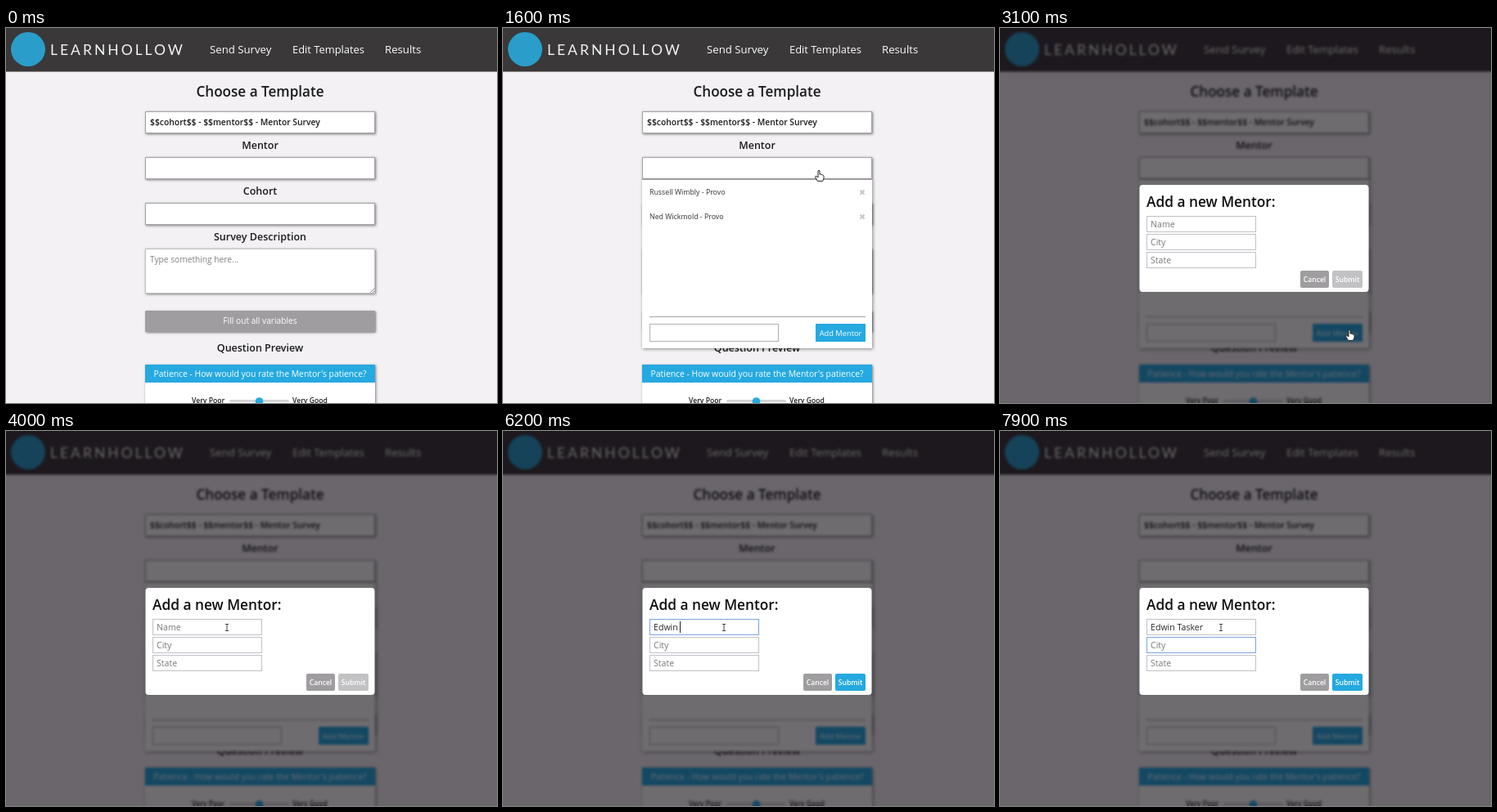
Write an HTML page with a canvas that moves like this. It is 600 px wide and 459 px high and loops after 8000 ms.

```html
<!DOCTYPE html>
<html lang="en">
<head>
<meta charset="utf-8">
<title>Survey template form</title>
<style>
html, body { margin: 0; width: 100%; height: 100%; overflow: hidden; background: #f3f1f4; }
canvas { display: block; width: 600px; height: 459px; }
</style>
</head>
<body>
<canvas id="stage" width="600" height="459"></canvas>
<script>
const W = 600, H = 459, LOOP = 8000, STEP = 100;
const BLUE = '#25a9e0', INK = '#1b1a1c', GREY = '#9f9d9f';
const stage = document.getElementById('stage').getContext('2d');

// Times of interface changes, in ms
const OPEN = 1600, HOVER = 2700, MODAL = 3100, FOCUS = 4200, TAB = 7500;
const NAME = 'Edwin Tasker';
const KEYS = [5400, 5600, 5700, 5800, 5900, 6200, 6300, 6500, 6600, 6800, 6900, 7100];

// Pointer path: time, x, y of the hot spot
const PATH = [
  [100, 572, 452], [400, 560, 372], [800, 541, 292],
  [1300, 541, 292], [1600, 386, 174],
  [1900, 386, 174], [2700, 427, 369],
  [3100, 427, 369], [3700, 283, 247],
  [3900, 283, 247], [4000, 270, 240]
];

const clamp = v => Math.max(0, Math.min(1, v));
const ease = v => v * v * (3 - 2 * v);

function text(c, str, x, y, size, color = INK, weight = 400, align = 'left') {
  c.font = `${weight} ${size}px "Open Sans", "Noto Sans", sans-serif`;
  c.fillStyle = color;
  c.textAlign = align;
  c.fillText(str, x, y);
}

function rect(c, x, y, w, h, color, radius = 0) {
  c.fillStyle = color;
  c.beginPath();
  c.roundRect(x, y, w, h, radius);
  c.fill();
}

function outline(c, x, y, w, h, color) {
  c.strokeStyle = color;
  c.lineWidth = 1;
  c.strokeRect(x + 0.5, y + 0.5, w - 1, h - 1);
}

function shadowed(c, draw, blur = 3, alpha = 0.5) {
  c.save();
  c.shadowColor = `rgba(0,0,0,${alpha})`;
  c.shadowBlur = blur;
  c.shadowOffsetX = c.shadowOffsetY = 1;
  draw();
  c.restore();
}

function field(c, y, h, border = '#a5a3a6') {
  shadowed(c, () => rect(c, 170, y, 281, h, '#fff'));
  outline(c, 170, y, 281, h, border);
}

function drawNav(c) {
  rect(c, 0, 0, W, 53.5, '#3a3839');
  c.fillStyle = '#2b9dca';
  c.beginPath();
  c.arc(27, 26, 21, 0, 7);
  c.fill();
  c.font = '400 17.5px Lato, sans-serif';
  c.fillStyle = '#f4f4f4';
  c.textAlign = 'left';
  c.letterSpacing = '3px';
  c.fillText('LEARNHOLLOW', 54, 32.5);
  c.letterSpacing = '0px';
  text(c, 'Send Survey', 249, 31, 13.2, '#fff', 500);
  text(c, 'Edit Templates', 350, 31, 12.9, '#fff', 500);
  text(c, 'Results', 463, 31, 13.2, '#fff', 500);
}

function drawForm(c) {
  const heading = (str, y, size = 12.5) => text(c, str, 310.5, y, size, INK, 600, 'center');
  heading('Choose a Template', 84, 17.1);
  field(c, 102, 27);
  text(c, '$$cohort$$ - $$mentor$$ - Mentor Survey', 176, 119, 10.35, INK, 600);
  heading('Mentor', 148);
  field(c, 158, 27);
  heading('Cohort', 204);
  field(c, 214, 27);
  heading('Survey Description', 260);
  field(c, 270, 55, '#c4c2c5');
  text(c, 'Type something here...', 176, 287, 10.2, '#828083');
  c.strokeStyle = '#8d8b8d';
  c.beginPath();
  c.moveTo(445, 324); c.lineTo(450, 319);
  c.moveTo(448, 324); c.lineTo(450, 322);
  c.stroke();
  shadowed(c, () => rect(c, 170, 346, 281, 26, GREY, 1));
  text(c, 'Fill out all variables', 310.5, 362, 10.2, '#fff', 400, 'center');
  heading('Question Preview', 396);
  shadowed(c, () => rect(c, 170, 412, 281, 60, '#fff'));
  rect(c, 170, 412, 281, 22, BLUE);
  text(c, "Patience - How would you rate the Mentor's patience?", 310.5, 427, 10.4, '#fff', 400, 'center');
  text(c, 'Very Poor', 227, 459, 8.6, INK, 600);
  text(c, 'Very Good', 350, 459, 8.6, INK, 600);
  rect(c, 273, 455, 73, 3, '#d4d4d6', 1.5);
  c.fillStyle = BLUE;
  c.beginPath();
  c.arc(309.5, 457, 4.8, 0, 7);
  c.fill();
}

function drawList(c, hover) {
  shadowed(c, () => rect(c, 170, 185, 281, 207, '#fff'), 4, 0.45);
  outline(c, 170, 158, 281, 28, '#a5a3a6');
  ['Russell Wimbly - Provo', 'Ned Wickmold - Provo'].forEach((name, i) => {
    const y = 201 + i * 30;
    text(c, name, 179, y + 2.7, 8.8, '#333134');
    c.strokeStyle = '#c3c7ce';
    c.lineWidth = 2;
    c.beginPath();
    c.moveTo(436.5, y - 2.5); c.lineTo(441.5, y + 2.5);
    c.moveTo(441.5, y - 2.5); c.lineTo(436.5, y + 2.5);
    c.stroke();
  });
  rect(c, 179, 353, 264, 1, '#a3a3a5');
  outline(c, 179, 362, 158, 22, '#b2b2b6');
  rect(c, 382, 362, 61, 22, hover ? '#26b6f2' : BLUE);
  text(c, 'Add Mentor', 412.5, 376.5, 9.3, '#fff', 400, 'center');
}

function drawPage(c, open, hover) {
  rect(c, 0, 0, W, H, '#f3f1f4');
  drawNav(c);
  drawForm(c);
  if (open) drawList(c, hover);
}

function layer(draw) {
  const canvas = document.createElement('canvas');
  canvas.width = W;
  canvas.height = H;
  draw(canvas.getContext('2d'));
  return canvas;
}

const closedPage = layer(c => drawPage(c, false, false));
const openPage = layer(c => drawPage(c, true, false));
const hoverPage = layer(c => drawPage(c, true, true));
const dimPage = layer(c => {
  c.drawImage(openPage, 0, 0);
  c.filter = 'blur(1.7px)';
  c.drawImage(openPage, 0, 0);
  c.filter = 'none';
  rect(c, 0, 0, W, H, 'rgba(8,2,9,0.58)');
});

function drawModal(c, t) {
  rect(c, 170.5, 192, 280, 131, '#fff', 4);
  text(c, 'Add a new Mentor:', 179, 218.5, 17.3, '#0f0e10', 600);
  const typed = NAME.slice(0, KEYS.filter(k => k <= t).length);
  const focus = t < FOCUS ? -1 : t < TAB ? 0 : 1;
  ['Name', 'City', 'State'].forEach((label, i) => {
    const top = 230 + i * 22;
    const value = i === 0 ? typed : '';
    outline(c, 179, top, 134, 20, i === focus ? '#7ba3dd' : '#c0c0c8');
    text(c, value || label, 184, top + 13.5, 10.6, value ? '#29282a' : '#7b797c');
    const blinkOff = (t >= 4900 && t < KEYS[0]) || t >= 7900;
    if (i === focus && !blinkOff) {
      const x = 184 + (value ? c.measureText(value).width : 0);
      rect(c, Math.floor(x), top + 3, 1, 14, '#222');
    }
  });
  rect(c, 367, 297, 35, 21, GREY, 2);
  rect(c, 406, 297, 37, 21, typed ? BLUE : '#c2c1c3', 2);
  text(c, 'Cancel', 384.5, 310.5, 8.6, '#fff', 600, 'center');
  text(c, 'Submit', 424.5, 310.5, 8.6, '#fff', 600, 'center');
}

function pointerAt(t) {
  let i = PATH.findIndex(p => p[0] > t);
  if (i < 0) i = PATH.length;
  const a = PATH[i - 1], b = PATH[i] || a;
  const k = ease(clamp((t - a[0]) / (b[0] - a[0] || 1)));
  return [a[1] + (b[1] - a[1]) * k, a[2] + (b[2] - a[2]) * k];
}

const ARROW = new Path2D('M0 0V12L2.8 9.5L4.6 13.5L6.3 12.7L4.6 8.9H8.4Z');
const HAND = new Path2D('M-1 1Q0-.6 1 1V5.2Q2.4 4.3 3 5.6Q4.3 4.9 4.7 6.2Q6 5.9 6 7.5V9.7L4.7 13.4H-1.5L-4.2 9Q-4.7 7.3-3.3 7.2L-1 9Z');

function drawPointer(c, t) {
  if (t < PATH[0][0]) return;
  const [x, y] = pointerAt(t);
  const overField = x > 170 && x < 451 && y > 158 && y < 186;
  const overButton = x > 382 && x < 443 && y > 362 && y < 384;
  const overInput = x > 179 && x < 313 && y > 230 && y < 294;
  c.save();
  c.translate(x, y);
  c.lineWidth = 1;
  if (t > MODAL && overInput) {
    c.strokeStyle = '#444';
    c.beginPath();
    c.moveTo(-2, -3.5); c.lineTo(2, -3.5);
    c.moveTo(0, -3.5); c.lineTo(0, 4.5);
    c.moveTo(-2, 4.5); c.lineTo(2, 4.5);
    c.stroke();
  } else {
    const hand = t <= MODAL && (overField || overButton);
    const shape = hand ? HAND : ARROW;
    c.fillStyle = '#fff';
    c.strokeStyle = '#222';
    c.fill(shape);
    c.stroke(shape);
  }
  c.restore();
}

function render(t) {
  const page = t < OPEN ? closedPage : t < HOVER ? openPage : t < MODAL ? hoverPage : dimPage;
  stage.drawImage(page, 0, 0);
  if (t >= MODAL) drawModal(stage, t);
  drawPointer(stage, t);
}

const start = performance.now();
function tick() {
  const t = (performance.now() - start) % LOOP;
  render(Math.floor(t / STEP) * STEP);
  requestAnimationFrame(tick);
}
tick();
</script>
</body>
</html>
```
